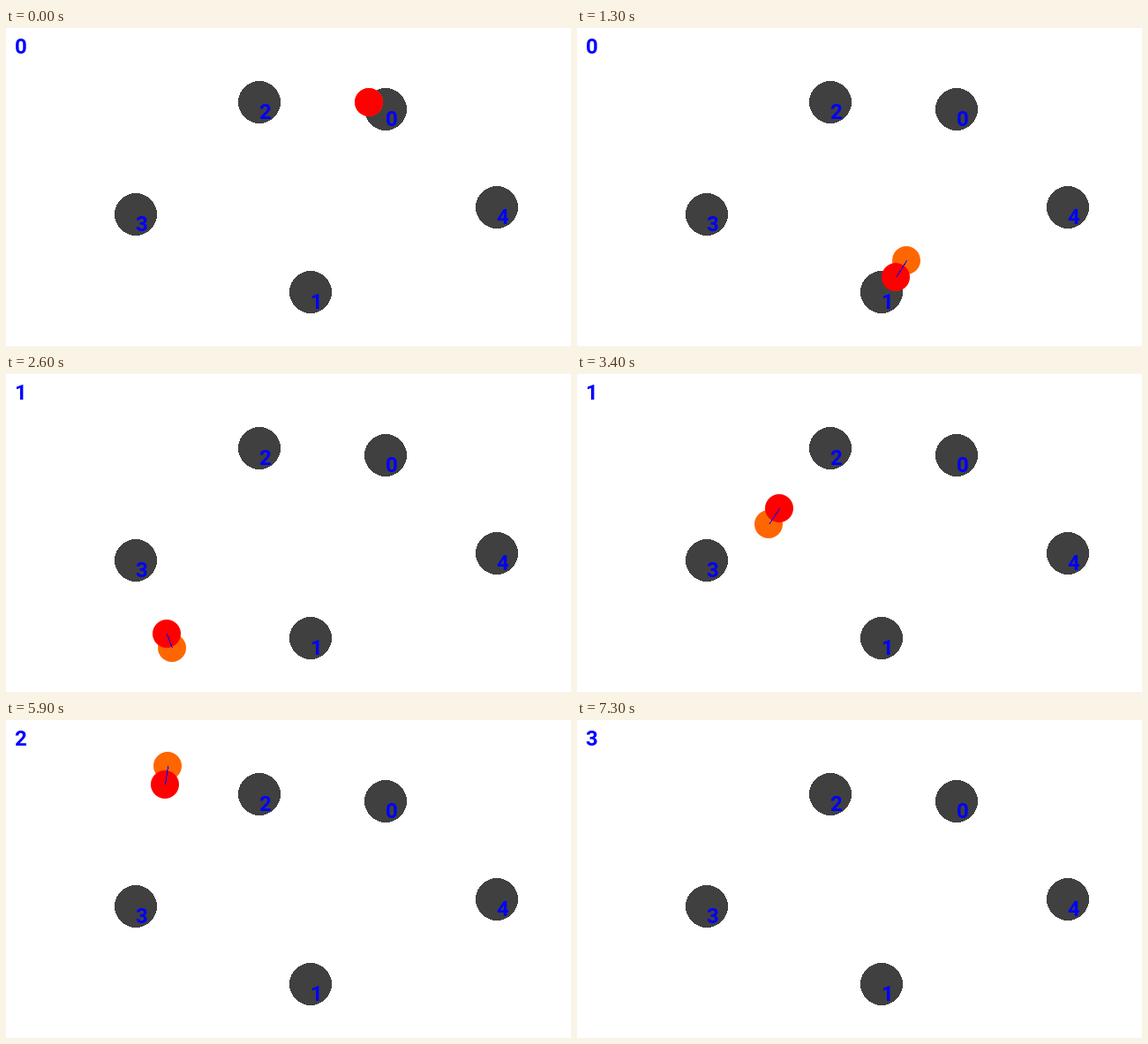
These frames come from a looping animation (640x360 px, 8000 ms). An HTML page:

```html
<!DOCTYPE html>
<html lang="en">
<head>
<meta charset="utf-8">
<title>Checkpoint run</title>
<style>
  html, body { margin: 0; width: 100%; height: 100%; overflow: hidden; background: #fff; }
  svg { display: block; width: 640px; height: 360px; }
  .checkpoint, line { shape-rendering: crispEdges; }
  text { font: bold 24px Roboto, "Liberation Sans", sans-serif; fill: #00f; }
</style>
</head>
<body>
<svg id="stage" viewBox="0 0 640 360"></svg>
<script>
const LOOP = 8000, STEP = 100;
const checkpoints = [[430, 92], [345, 299], [287, 84], [147, 211], [556, 203]];
const reachedAt = [14, 38, 65]; // steps at which the counter goes up

// Key points of the flight: position and velocity in pixels per step
const keys = [
  { step: 0, pos: [411, 84], vel: [0, 2.2] },
  { step: 6, pos: [411, 150], vel: [0, 17.3] },
  { step: 9, pos: [401, 205], vel: [-7, 19] },
  { step: 18, pos: [281, 352], vel: [-19.4, 7.6] },
  { step: 27, pos: [179, 277], vel: [-2, -17.2] },
  { step: 34, pos: [229, 152], vel: [12.3, -18.5] },
  { step: 43, pos: [316, -21], vel: [-2, -20] },
  { step: 55, pos: [196, -5], vel: [-5, 17.3] },
  { step: 63, pos: [172, 166], vel: [-1, 24.5] },
  { step: 72, pos: [156, 380], vel: [1.5, 22] }
];

const stage = document.getElementById("stage");

function set(node, attrs) {
  for (const key in attrs) node.setAttribute(key, attrs[key]);
}

function add(name, attrs, content = "") {
  const node = document.createElementNS("http://www.w3.org/2000/svg", name);
  set(node, attrs);
  node.textContent = content;
  return stage.appendChild(node);
}

// Cubic Hermite curve between key points, snapped to whole pixels
function position(step) {
  const s = Math.min(Math.max(step, 0), keys.at(-1).step);
  const next = Math.max(1, keys.findIndex(key => key.step >= s));
  const a = keys[next - 1], b = keys[next];
  const span = b.step - a.step;
  const u = (s - a.step) / span, w = 1 - u;
  return [0, 1].map(axis => Math.round(
    w * w * (1 + 2 * u) * a.pos[axis] + u * u * (1 + 2 * w) * b.pos[axis] +
    span * u * w * (w * a.vel[axis] - u * b.vel[axis])
  ));
}

checkpoints.forEach(([x, y], i) => {
  add("circle", { class: "checkpoint", cx: x, cy: y, r: 24, fill: "#404040" });
  add("text", { x, y: y + 19 }, i);
});
const previous = add("circle", { r: 16, fill: "#ff6600" });
const current = add("circle", { r: 16, fill: "#f00" });
const link = add("line", { stroke: "#00f", "stroke-width": 1 });
const counter = add("text", { x: 10, y: 29 });

function render(time) {
  const step = Math.floor((time % LOOP) / STEP);
  const [px, py] = position(step - 1);
  const [x, y] = position(step);
  set(previous, { cx: px, cy: py });
  set(current, { cx: x, cy: y });
  set(link, { x1: px + 0.5, y1: py + 0.5, x2: x + 0.5, y2: y + 0.5 });
  counter.textContent = reachedAt.filter(s => step >= s).length;
}

let start;
function tick(now) {
  start ??= now;
  render(now - start);
  requestAnimationFrame(tick);
}
render(0);
requestAnimationFrame(tick);
</script>
</body>
</html>
```
